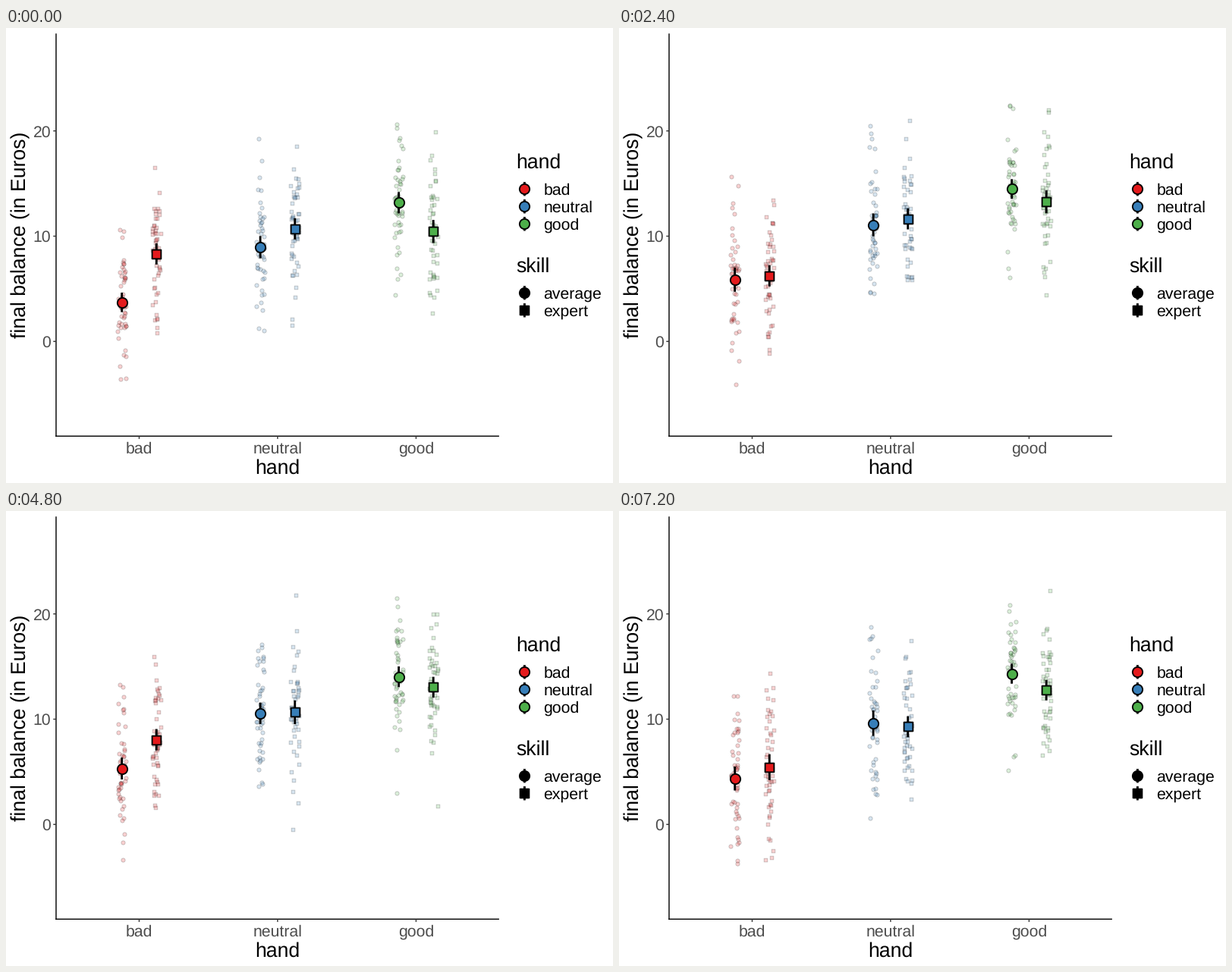
A matplotlib script for the animation above (8000 ms loop, 800 by 600 pixels).

```python
import numpy as np
import matplotlib.pyplot as plt
from matplotlib.animation import FuncAnimation
from matplotlib.collections import LineCollection

plt.rcParams["font.family"] = "Liberation Sans"
plt.rcParams["text.hinting"] = "none"

DPI = 100
PT = 72 / DPI  # points per pixel
COLORS = ["#E41A1C", "#377EB8", "#4DAF4A"]
HANDS = ["bad", "neutral", "good"]
SKILLS = ["average", "expert"]
GREY = "#4D4D4D"

# Layout in pixels
LEFT, RIGHT, TOP, BOTTOM = 66, 649.9, 7.3, 538.2
MID_X, MID_Y = (LEFT + RIGHT) / 2, (TOP + BOTTOM) / 2
STEP = (RIGHT - LEFT) / 3.2
ZERO_Y, UNIT = 413.3, 13.88
KEY, KEY_X, LABEL_X = 23.04, 683.4, 708.2
TITLE, LABEL = 26.67, 21.33
AXIS_W, TICK, RANGE_W = 1.42, 3.67, 2.85

# Simulation: group means per run, in Euros (average, expert for each hand)
N, SD, JITTER = 50, 3.8, 5.5
MEANS = np.array([
    [3.71, 8.32, 8.96, 10.70, 13.18, 10.45],
    [3.21, 7.93, 9.39, 10.66, 14.39, 10.77],
    [5.86, 6.23, 11.07, 11.64, 14.48, 13.26],
    [4.57, 7.28, 9.98, 10.28, 13.54, 11.78],
    [5.31, 8.05, 10.55, 10.66, 14.03, 13.04],
    [4.11, 7.02, 8.79, 11.92, 13.54, 12.68],
    [4.36, 5.44, 9.62, 9.28, 14.32, 12.75],
])
RUNS, GROUPS = MEANS.shape


def hand_x(i):
    return LEFT + STEP * (0.6 + i)


def to_y(euros):
    return ZERO_Y - UNIT * euros


CENTERS = np.array([hand_x(g // 2) + STEP * (g % 2 - 0.5) / 4
                    for g in range(GROUPS)])

rng = np.random.default_rng(12)
balance = rng.normal(0, SD, (RUNS, GROUPS, N))
balance += (MEANS - balance.mean(axis=2))[..., None]
error = 1.96 * balance.std(axis=2, ddof=1) / np.sqrt(N)
dot_x = CENTERS[:, None] + rng.uniform(-JITTER, JITTER, balance.shape)
points = np.stack([dot_x, to_y(balance)], axis=-1)

fig = plt.figure(figsize=(8, 6), dpi=DPI, facecolor="white")
ax = fig.add_axes([0, 0, 1, 1])
ax.set_xlim(0, 800)
ax.set_ylim(600, 0)
ax.axis("off")


def line(x, y, width=AXIS_W, color="black", z=1):
    ax.plot(x, y, color=color, lw=width * PT, solid_capstyle="butt",
            zorder=z, snap=False)


def text(x, y, s, size, color="black", ha="left", **kw):
    ax.text(x, y, s, fontsize=size * PT, color=color, ha=ha,
            va="baseline", **kw)


def marks(x, y, square, size, stroke, fill, z, alpha=None):
    side = size * (0.886 if square else 1)
    return ax.scatter(x, y, s=(side * PT) ** 2, marker="s" if square else "o",
                      facecolor=fill, edgecolor="black", lw=stroke * PT,
                      alpha=alpha, zorder=z, snap=False)


def mean_mark(x, y, square, fill):
    return marks(x, y, square, 13.27, 1.89, fill, 5)


def legend(y, title, labels, fills, squares):
    text(671.9, y - 27.8, title, TITLE)
    for i, (label, fill, square) in enumerate(zip(labels, fills, squares)):
        key_y = y + KEY * i
        line([KEY_X] * 2, [key_y - 0.4 * KEY, key_y + 0.4 * KEY], RANGE_W, z=4)
        mean_mark([KEY_X], [key_y], square, fill)
        text(LABEL_X, key_y + 7.8, label, LABEL)


# Axes
line([LEFT, LEFT], [TOP, BOTTOM + AXIS_W / 2])
line([LEFT - AXIS_W / 2, RIGHT], [BOTTOM, BOTTOM])
for value in (0, 10, 20):
    y = to_y(value)
    line([LEFT - TICK, LEFT], [y, y], color="#333333")
    text(LEFT - 6.7, y + 7.6, str(value), LABEL, GREY, "right")
for i, hand in enumerate(HANDS):
    x = hand_x(i)
    line([x, x], [BOTTOM, BOTTOM + TICK], color="#333333")
    text(x, BOTTOM + 22.2, hand, LABEL, GREY, "center")
text(MID_X, 587.4, "hand", TITLE, ha="center")
text(26, MID_Y, "final balance (in Euros)", TITLE, ha="center",
     rotation=90, rotation_mode="anchor")

legend(212.2, "hand", HANDS, COLORS, [False] * 3)
legend(349.2, "skill", SKILLS, ["black"] * 2, [False, True])

# Moving parts
dots = [marks([], [], g % 2, 5.2, 0.95, COLORS[g // 2], 2, 0.2)
        for g in range(GROUPS)]
means = [mean_mark([], [], g % 2, COLORS[g // 2]) for g in range(GROUPS)]
ranges = LineCollection([], colors="black", linewidths=RANGE_W * PT,
                        capstyle="butt", zorder=4)
ranges.set_snap(False)
ax.add_collection(ranges, autolim=False)


def update(frame):
    run = frame // 3  # each run is held for three ticks
    for g in range(GROUPS):
        dots[g].set_offsets(points[run, g])
        means[g].set_offsets([[CENTERS[g], to_y(MEANS[run, g])]])
    ranges.set_segments([[(x, to_y(m - e)), (x, to_y(m + e))]
                         for x, m, e in zip(CENTERS, MEANS[run], error[run])])
    return [*dots, *means, ranges]


anim = FuncAnimation(fig, update, frames=20, interval=400, repeat=True,
                     repeat_delay=0, blit=False)
plt.show()
```
